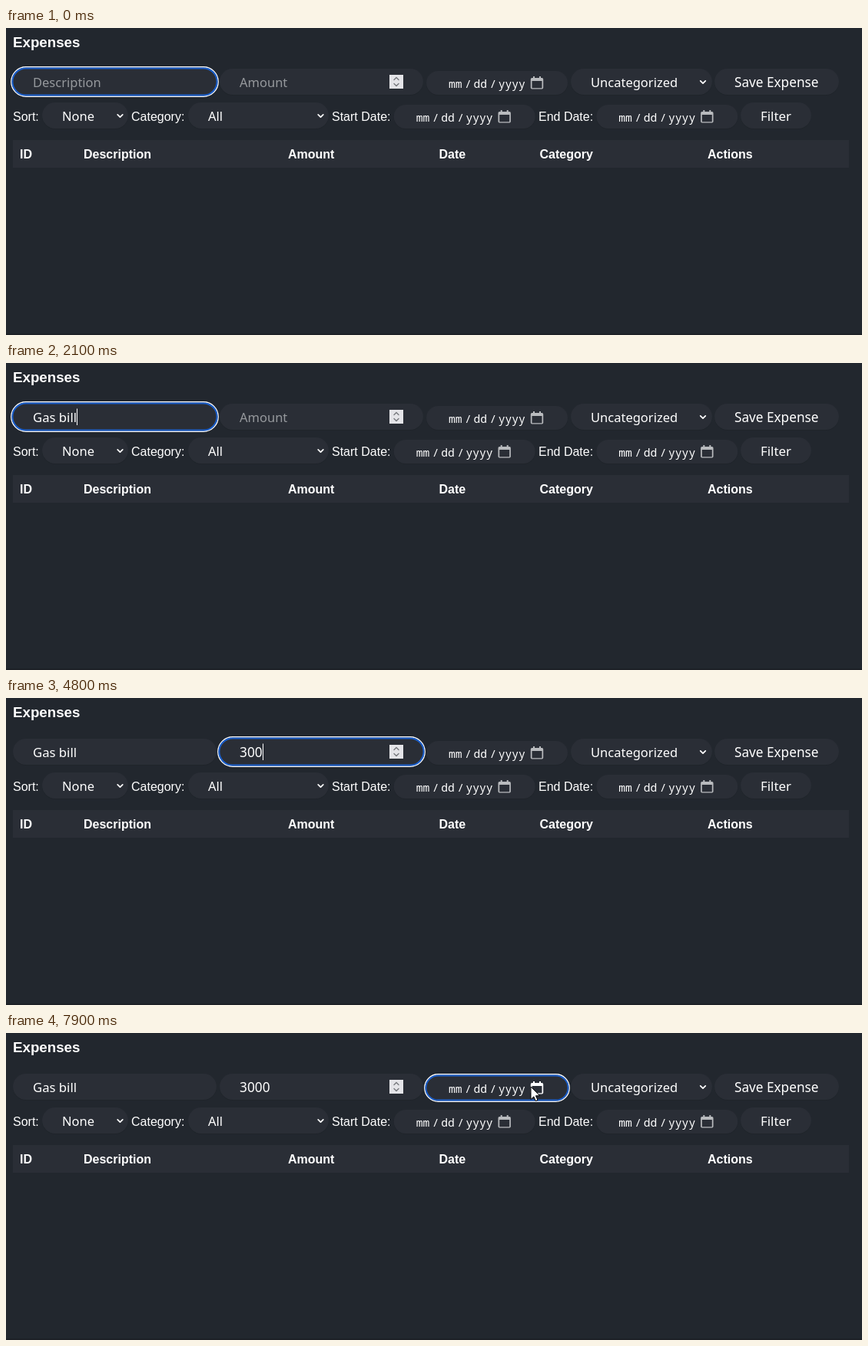
Animation, 1114 px wide and 400 px high, one loop 8000 ms. Source, as an HTML page:

```html
<!DOCTYPE html>
<html lang="en">
<head>
<meta charset="utf-8">
<title>Expenses</title>
<style>
html, body { margin: 0; width: 100%; height: 100%; overflow: hidden; background: #22272e; }
svg { display: block; width: 1114px; height: 400px; }
text { fill: #fff; white-space: pre; }
.label { font: 16px "Liberation Sans", Arial, sans-serif; }
.head { font: bold 16px "Liberation Sans", Arial, sans-serif; }
.field { font: 16.5px "Noto Sans", "Open Sans", sans-serif; }
.date { font: 14.67px "Noto Sans Mono", monospace; }
.pill { fill: #2a2e36; }
.line { fill: none; stroke-linecap: round; stroke-linejoin: round; }
</style>
</head>
<body>
<svg id="stage" viewBox="0 0 1114 400" xmlns="http://www.w3.org/2000/svg"></svg>
<script>
const stage = document.getElementById("stage");
const LOOP = 8000, STEP = 100, BLINK = 530;

function add(tag, attrs, text) {
  const el = document.createElementNS("http://www.w3.org/2000/svg", tag);
  for (const k in attrs) el.setAttribute(k, attrs[k]);
  if (text !== undefined) el.textContent = text;
  stage.appendChild(el);
  return el;
}

function write(cls, x, y, text, size) {
  const el = add("text", { class: cls, x, y }, text);
  if (size) el.style.fontSize = size + "px";
  return el;
}

function pill(x, y, width, height) {
  // soft lower edge under the control
  add("rect", { x, y: y + 1, width, height, rx: height / 2, fill: "#1f242a" });
  add("rect", { class: "pill", x, y, width, height, rx: height / 2 });
}

function chevron(x, y) {
  add("path", { class: "line", d: `M${x - 3.3} ${y - 1.6}l3.3 3.3 3.3-3.3`, stroke: "#fff", "stroke-width": 1.7 });
}

function calendar(x, y) {
  return add("path", {
    d: `M${x + 3} ${y}h2v2h6v-2h2v2h1.5a1.7 1.7 0 0 1 1.7 1.7v11a1.7 1.7 0 0 1-1.7 1.7h-13a1.7 1.7 0 0 1-1.7-1.7v-11a1.7 1.7 0 0 1 1.7-1.7h1.5z` +
       `M${x + 1.5} ${y + 6}v9.2h13v-9.2z`,
    fill: "#b9bbbe", "fill-rule": "evenodd"
  });
}

function dateField(x, y) {
  pill(x, y, 184, 31);
  const base = y + 21.5;
  [[29, "mm"], [50, "/"], [61.5, "dd"], [82.5, "/"], [93.7, "yyyy"]]
    .forEach(([dx, s]) => write("date", x + dx, base, s));
  return calendar(x + 136, y + 7);
}

add("rect", { width: 1114, height: 400, fill: "#22272e" });
add("rect", { y: 398, width: 1114, height: 2, fill: "#1d2127" });
write("head", 9, 24.5, "Expenses", 18.72);

// entry row
pill(9, 53, 265, 34);
pill(278, 53, 265, 34);
const icon = dateField(547, 56);
pill(735, 53, 184, 34);
pill(922, 53, 162, 34);
write("field", 761, 76.5, "Uncategorized");
chevron(907, 70.5);
write("field", 948, 76.5, "Save Expense", 17.2);

add("rect", { x: 499, y: 61, width: 18, height: 18, fill: "#e4e4e8" });
add("path", { class: "line", d: "M505 67.5l3-3 3 3M505 72.5l3 3 3-3", stroke: "#75777c", "stroke-width": 1.3 });

// filter row
write("label", 9, 121, "Sort:");
pill(47, 97, 112, 34);
write("field", 73, 120.5, "None");
chevron(148.5, 114.5);
write("label", 163, 121, "Category:");
pill(237, 97, 183, 34);
write("field", 263, 120.5, "All");
chevron(409.5, 114.5);
write("label", 424, 121, "Start Date:");
dateField(504.7, 100);
write("label", 693, 121, "End Date:");
dateField(768.3, 100);
pill(956, 97, 92, 34);
write("field", 982, 120.5, "Filter", 16.9);

// table head
add("rect", { x: 9, y: 146, width: 1088, height: 36, fill: "#2a2e36" });
[[18, "ID"], [101, "Description"], [367, "Amount"], [563.5, "Date"], [694.5, "Category"], [913, "Actions"]]
  .forEach(([x, s]) => write("head", x, 170, s));

// moving parts
const desc = write("field", 35, 76.5, "");
const amount = write("field", 304, 76.5, "");
const outer = add("rect", { fill: "none", stroke: "#fff", "stroke-width": 1.4 });
const inner = add("rect", { fill: "none", stroke: "#1b5fcc", "stroke-width": 2 });
const caret = add("rect", { y: 59.5, width: 1, height: 21.5, fill: "#fff" });
const mouse = add("path", {
  d: "M0 0V16.5L3.8 12.9L6.3 18.6L9 17.4L6.5 11.8H11.7Z",
  fill: "#fff", stroke: "#000", "stroke-width": 1, "stroke-linejoin": "round"
});

const TAB = 2600, ERASE = 6000, ENTER = 7100, ARRIVE = 7600, CLICK = 7800;
const descKeys = [800, 950, 1100, 1350, 1500, 1650, 1800, 1950];
const amountKeys = [4500, 4700, 4800, 4900, 5100];

function setField(el, text, hint, size) {
  el.textContent = text || hint;
  el.style.fill = text ? "#fff" : "#96999d";
  el.style.fontSize = (text ? size : 16.5) + "px";
}

function ringAt(rect, x, y, w, h, pad) {
  const box = { x: x - pad, y: y - pad, width: w + 2 * pad, height: h + 2 * pad, rx: h / 2 + pad };
  for (const k in box) rect.setAttribute(k, box[k]);
}

function render(t) {
  const typed = descKeys.filter(k => k <= t).length;
  let digits = amountKeys.filter(k => k <= t).length;
  if (t >= ERASE) digits--;
  setField(desc, "Gas bill".slice(0, typed), "Description", 16.7);
  setField(amount, "30000".slice(0, digits), "Amount", 17.3);

  const box = t < TAB ? [9, 53, 265, 34] : t < CLICK ? [278, 53, 265, 34] : [547, 56, 184, 31];
  ringAt(outer, ...box, 2.2);
  ringAt(inner, ...box, 0.6);

  // each key press restarts the blink
  const last = Math.max(-760, ...[...descKeys, TAB, ...amountKeys, ERASE].filter(k => k <= t));
  const lit = Math.floor((t - last) / BLINK) % 2 === 0;
  const el = t < TAB ? desc : amount, count = t < TAB ? typed : digits;
  const width = count ? el.getComputedTextLength() : 0;
  caret.setAttribute("x", Math.round((t < TAB ? 35 : 304) + width));
  caret.style.display = lit && t < CLICK ? "" : "none";

  const p = Math.min(1, Math.max(0, (t - ENTER) / (ARRIVE - ENTER)));
  const e = 1 - (1 - p) ** 2;
  mouse.setAttribute("transform", `translate(${683 + 30 * (1 - e)} ${70 + 325 * (1 - e)})`);
  mouse.style.display = t >= ENTER ? "" : "none";
  icon.setAttribute("fill", t >= ARRIVE ? "#fff" : "#b9bbbe");
}

const start = performance.now();
function tick() {
  const t = (performance.now() - start) % LOOP;
  render(Math.floor(t / STEP) * STEP);
  requestAnimationFrame(tick);
}
tick();
</script>
</body>
</html>
```
